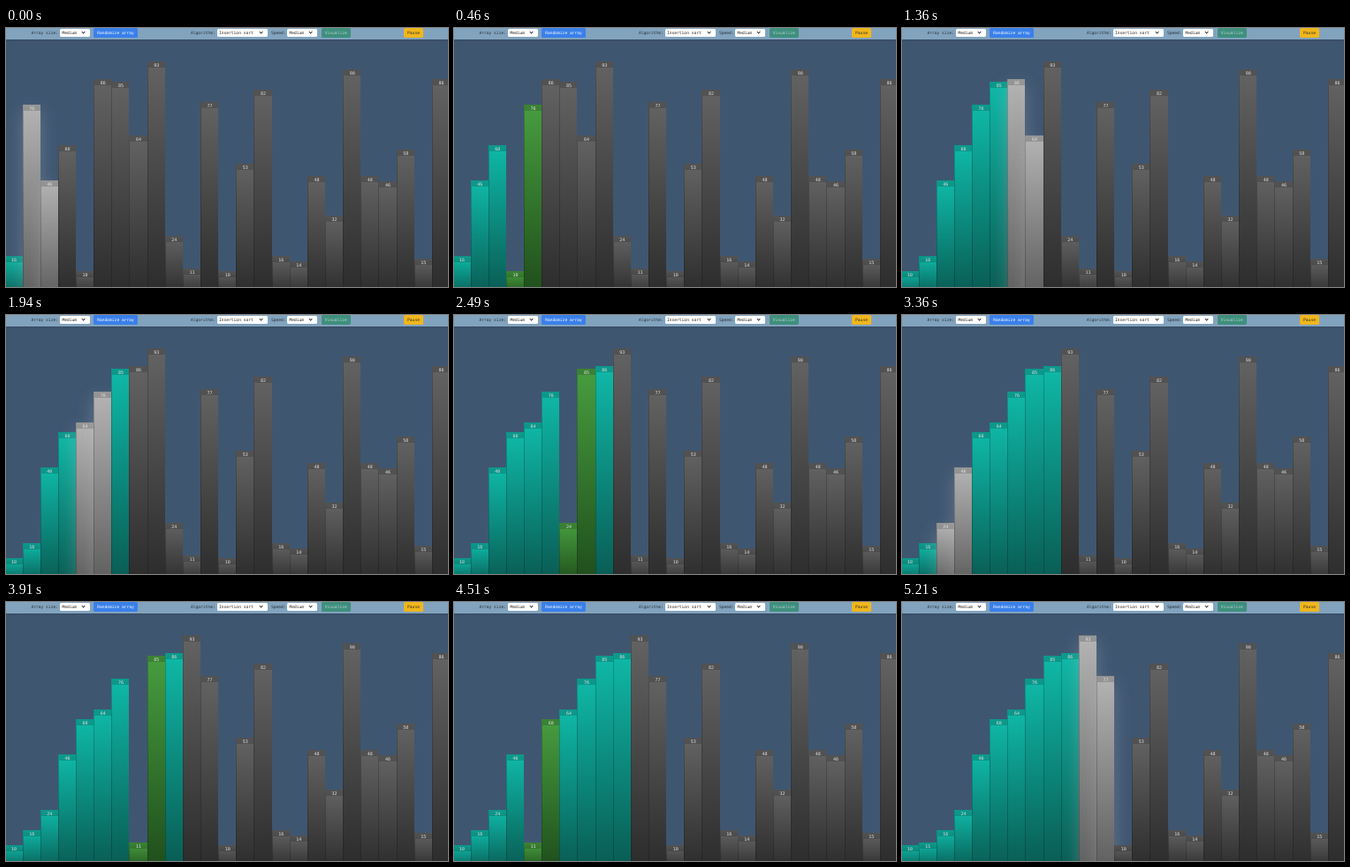
Write an HTML page that moves like this. It is 500 px wide and 294 px high and loops after 5.28 s.

```html
<!DOCTYPE html>
<html lang="en">
<head>
<meta charset="utf-8">
<title>Insertion sort</title>
<style>
  html, body { margin: 0; width: 100%; height: 100%; overflow: hidden; }
  #stage {
    position: relative; width: 500px; height: 294px; overflow: hidden;
    background: #3f5671;
    font: 4.6px/1 "DejaVu Sans Mono", "Liberation Mono", monospace;
    white-space: nowrap;
  }
  header {
    position: absolute; left: 0; top: 0; width: 500px; height: 13px;
    background: #82a3be; box-shadow: 0 1px 3px rgba(0, 0, 0, .15); color: #26323c;
  }
  header > * { position: absolute; top: 0; height: 11px; line-height: 11px; }
  .select { top: 1px; height: 9px; line-height: 9px; background: #fff; border-radius: 1.5px; color: #222; text-indent: 2.5px; }
  .select::after {
    content: ""; position: absolute; right: 5.5px; top: 2.3px; width: 2.2px; height: 2.2px;
    border: solid #333; border-width: 0 .9px .9px 0; transform: rotate(45deg);
  }
  .button { border-radius: 1.5px; text-align: center; color: #fff; }
  .bar {
    position: absolute; width: 20.14px; box-sizing: border-box;
    border-left: 1px solid rgba(0, 0, 0, .2);
    background: linear-gradient(var(--hi), var(--lo)) border-box;
  }
  .bar span {
    display: block; height: 7px; line-height: 8.4px; font-size: 5px;
    text-align: center; color: #e2e2e2; background: rgba(0, 0, 0, .17);
  }
  .idle { --hi: #636363; --lo: #2b2b2b; }
  .sorted { --hi: #0fb9a8; --lo: #095a52; }
  .swap { --hi: #479d3f; --lo: #1f4d1b; }
  .compare { --hi: #b4b4b4; --lo: #5e5e5e; box-shadow: 0 8px 20px rgba(200, 205, 210, .28); }
</style>
</head>
<body>
<div id="stage">
  <header>
    <span style="left:28.5px">Array size:</span>
    <div class="select" style="left:61px;width:34px">Medium</div>
    <div class="button" style="left:99px;width:50px;background:#3a80ea">Randomize array</div>
    <span style="left:209px">Algorithm:</span>
    <div class="select" style="left:238.5px;width:57px">Insertion sort</div>
    <span style="left:300px">Speed:</span>
    <div class="select" style="left:318px;width:34px">Medium</div>
    <div class="button" style="left:356.5px;width:33.5px;background:#3f8f7e;color:#b9d6cd">Visualize</div>
    <div class="button" style="left:450px;width:22px;background:#efb61e;color:#3a3116">Pause</div>
  </header>
</div>
<script>
const LOOP = 5280, FRAMES = 105, PHASES = 4;
const BASE = 304.9, UNIT = 2.87, PITCH = 20.14, LEFT = -1.5;
const values = [16, 76, 46, 60, 10, 86, 85, 63.8, 93, 24, 11, 77, 10, 52.7, 82,
                16, 14, 47.7, 32, 90, 47.7, 45.7, 58, 15, 86];

// Each swap: the array before it, the element being inserted, the left position.
function findSwaps(list, limit) {
  const a = [...list], swaps = [];
  for (let i = 1; i < a.length; i++) {
    for (let j = i - 1; j >= 0 && a[j] > a[j + 1]; j--) {
      swaps.push({ before: [...a], i, j });
      if (swaps.length === limit) return swaps;
      [a[j], a[j + 1]] = [a[j + 1], a[j]];
    }
  }
  return swaps;
}

// Ticks alternate between 30 and 70 ms, with a few slips: [first tick, delay].
const slips = [[0, 0], [32, 10], [44, 20], [50, 30], [77, 10], [78, 50]];
function tickTime(n) {
  if (n === 0) return 0;
  const delay = slips.filter(([from]) => n >= from).pop()[1];
  return 50 * n - (n % 2 ? 20 : 40) + delay;
}

const swaps = findSwaps(values, Math.ceil(FRAMES / PHASES));
const times = Array.from({ length: FRAMES }, (_, n) => tickTime(n));
const stage = document.getElementById("stage");

const bars = values.map((_, i) => {
  const bar = document.createElement("div");
  bar.style.left = LEFT + PITCH * i + "px";
  bar.append(document.createElement("span"));
  stage.append(bar);
  return bar;
});

function draw(n) {
  const { before, i, j } = swaps[Math.floor(n / PHASES)];
  const phase = n % PHASES;
  const a = [...before];
  if (phase >= 2) [a[j], a[j + 1]] = [a[j + 1], a[j]];
  const active = phase === 1 || phase === 2 ? "swap" : "compare";

  bars.forEach((bar, k) => {
    const state = k === j || k === j + 1 ? active : k < i ? "sorted" : "idle";
    bar.className = "bar " + state;
    bar.style.top = BASE - UNIT * a[k] + "px";
    bar.style.height = UNIT * a[k] + "px";
    bar.firstChild.textContent = Math.round(a[k]);
  });
}

const start = performance.now();
let shown = -1;
function tick() {
  const t = (performance.now() - start) % LOOP;
  let n = FRAMES - 1;
  while (times[n] > t) n--;
  if (n !== shown) draw(shown = n);
  requestAnimationFrame(tick);
}
tick();
</script>
</body>
</html>
```
